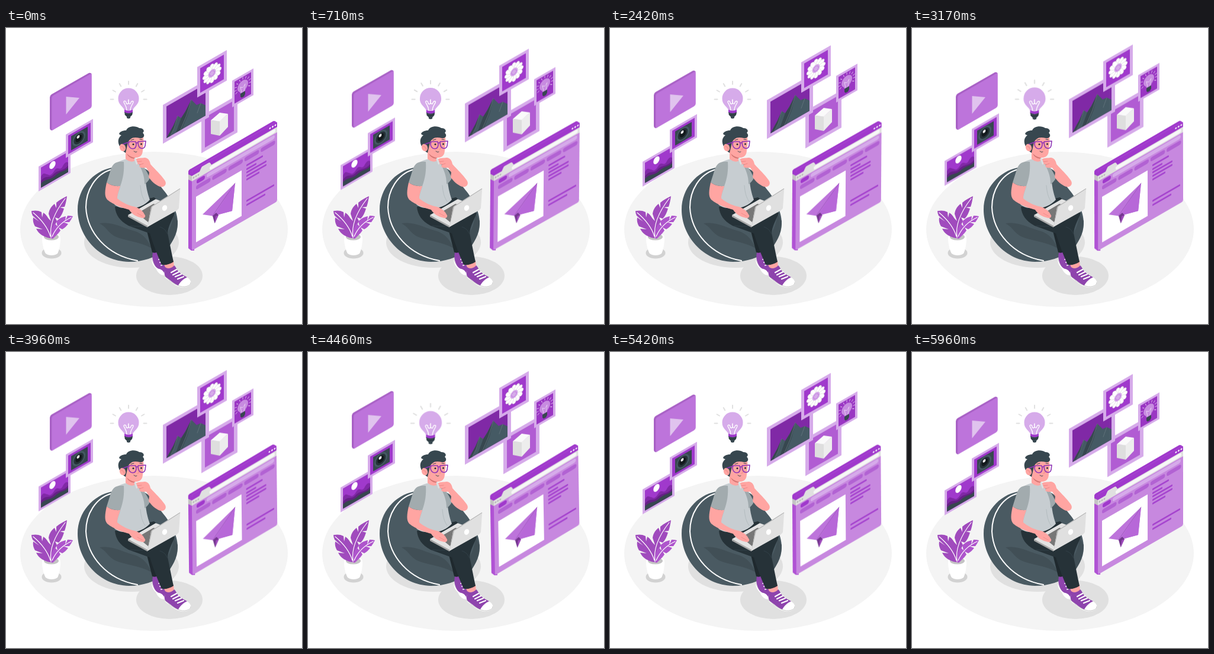
An HTML page for the animation above (6 s loop, 500 by 500 pixels).

```html
<!DOCTYPE html>
<html lang="en">
<head>
<meta charset="utf-8">
<title>Creative thinking</title>
<style>
html, body { margin: 0; width: 100%; height: 100%; overflow: hidden; background: #fff; }
svg { display: block; width: 100vw; height: 100vh; }
.float { animation: float 6s linear infinite; }
.quick { animation-duration: 3s; }
.beat { animation: beat 3s linear infinite; transform-origin: 207px 121px; }
.sway { animation: sway 6s linear infinite; transform-origin: 383px 266px; }
@keyframes float { 50% { transform: translateY(-10px); } }
@keyframes beat {
  0%, 30%, 40%, 60%, 100% { transform: scale(1); }
  10%, 50% { transform: scale(1.1); }
}
@keyframes sway {
  0%, 100% { transform: rotate(0deg); }
  25% { transform: rotate(1deg); }
  75% { transform: rotate(-1deg); }
}
.main { fill: #a039cc; }
.mid { fill: #bd74db; }
.pale { fill: #d6abea; }
.deep { fill: #8029a6; }
.dark { fill: #37474f; }
.slate { fill: #455a64; }
.ink { fill: #263238; }
.skin { fill: #ffa5a2; }
.white { fill: #fff; }
.grey { fill: #e0e0e0; }
.line { fill: none; stroke-linecap: round; stroke-linejoin: round; }
</style>
</head>
<body>
<svg viewBox="0 0 500 500">
  <ellipse cx="250" cy="340" rx="226" ry="131" fill="#f4f4f4"/>
  <g class="grey">
    <ellipse cx="212" cy="362" rx="80" ry="43"/>
    <ellipse cx="276" cy="418.5" rx="56" ry="32.5"/>
    <ellipse cx="77" cy="380" rx="16.5" ry="9.5" fill="#d2d2d2"/>
  </g>

  <!-- plant -->
  <g>
    <path class="white" d="M61 354C61 366 64 376 67 381C72 385 82 385 87 381C90 375 92 366 92 354Z"/>
    <ellipse class="white" cx="76.5" cy="353" rx="15.5" ry="7"/>
    <ellipse cx="76.5" cy="353" rx="12.5" ry="5.5" fill="#c4c4c4"/>
    <path d="M76 352C70 340 69 330 70 320L76 326L72 314C73 306 77 301 82 297L85 304L85 295C91 290 97 287 103 284C102 291 101 296 99 302L91 303L98 305C96 312 93 318 89 322L83 320L86 326C82 334 79 342 79 353Z" fill="#a04bbd"/>
    <path d="M75 355C65 354 55 348 51 339L62 340L49 335C46 330 45 325 46 320L56 327L45 317Q43 313 43 309C49 308 55 308 60 311L61 320L63 312C68 315 71 320 73 325L70 331L74 328C77 337 79 346 79 355Z" fill="#a04bbd"/>
    <path d="M75 355C75 345 78 336 82 330L87 335L85 327C89 322 95 319 101 318L100 326L104 317Q109 317 113 318C111 322 109 325 107 328L97 328L105 331C102 335 99 338 95 340L89 337L92 342C88 348 83 352 79 356Z" fill="#ae55cc"/>
    <g class="line" stroke="#fff" stroke-width="1.2">
      <path d="M76 354C73 334 82 311 100 288"/>
      <path d="M75 352C70 336 58 322 46 312"/>
      <path d="M78 352C84 338 95 327 110 320"/>
    </g>
  </g>

  <!-- bean bag -->
  <path d="M178 236C148 242 121 270 121 307C121 350 156 394 208 395C255 395 290 366 290 330C290 308 278 288 263 270C253 256 245 240 230 236C214 231 194 231 178 236Z" fill="#4a5a62"/>
  <path d="M158 330C178 326 196 337 214 342C232 347 239 357 246 372C224 360 202 360 184 352C174 347 168 335 158 330ZM272 348C278 338 282 325 283 313L290 326C290 342 284 356 277 367Z" fill="#414f56"/>
  <path class="line" d="M178 239C151 247 135 274 135 303C137 345 170 384 222 393" stroke="#fff" stroke-width="2"/>

  <!-- shoes -->
  <g fill="#8e44ad">
    <path d="M248 379L257 377C261 386 266 395 270 399L268 418C261 417 258 413 256 408C252 402 245 393 248 379Z"/>
    <path class="white" d="M246 391C249 400 254 406 259 407C264 408 268 413 268 418C260 418 256 412 253 406C249 402 246 397 246 391Z"/>
    <path class="skin" d="M266 397L283 393L284 404L270 407Z"/>
    <path class="white" d="M268 411C266 420 269 423 276 427C284 434 292 439 302 438C309 437 314 433 312 428C309 420 300 420 294 414Z"/>
    <path d="M269 404C274 408 281 405 284 401C287 403 288 408 292 412C296 416 302 419 306 421C299 424 294 429 291 435C283 432 278 426 270 421C266 417 269 410 269 404Z"/>
    <g class="line" stroke="#fff" stroke-width="2.2">
      <path d="M279 413L288 408M282 417L292 412M286 420L296 416M290 424L300 420"/>
      <path d="M258 391L263 389M260 396L266 393M262 401L268 398" stroke-width="1.8"/>
    </g>
    <path class="line" d="M268 419C277 428 290 438 302 437C308 436 312 434 312 430" stroke="#bcbcbc" stroke-width=".8"/>
  </g>

  <!-- trousers -->
  <path d="M238 343L247 379C252 381 256 379 258 375L268 399L272 360Z" fill="#1f292e"/>
  <path class="ink" d="M184 302C185 315 192 326 207 334L243 347C248 364 255 382 263 400C270 401 277 399 283 395C279 377 276 360 273 347C274 335 279 327 285 313L250 286L225 292Z"/>
  <path class="line" d="M210 334C225 336 238 335 248 331M272 347C270 341 266 338 260 336" stroke="#37474f" stroke-width=".7"/>

  <!-- shirt -->
  <path d="M190 226C199 221 212 219 221 222C229 226 233 236 235 249C236 266 239 280 243 290C235 299 224 304 210 305C198 305 188 303 183 298C184 287 188 278 190 266Z" fill="#c7cdd1"/>
  <path d="M222 225C231 230 237 240 243 253C241 258 238 261 234 264C234 250 230 240 222 225Z" fill="#9fa9ad"/>
  <path d="M199 226C184 224 179 231 176 242L170 261C177 266 186 268 193 267C198 254 200 240 199 226Z" fill="#a2abae"/>
  <path class="line" d="M193 267C189 279 186 287 185 298M227 266C228 278 230 286 235 293" stroke="#aab3b7" stroke-width=".7"/>

  <!-- laptop -->
  <path d="M206 316L253 289L292 304L239 336Z" fill="#e3e3e3"/>
  <path d="M206 316L239 334V337L206 319Z" fill="#a9a9a9"/>
  <path d="M222 313L249 297L257 299L240 328Z" fill="#777"/>

  <!-- left arm -->
  <path class="skin" d="M170 261C167 275 166 284 171 290C182 299 197 304 208 307C212 314 220 319 230 321C234 322 237 318 234 315C230 306 220 302 213 301C203 298 194 293 188 288C188 280 191 274 193 267C185 268 177 266 170 261Z"/>
  <path class="line" d="M222 313L231 318" stroke="#ed817f" stroke-width=".7"/>

  <path class="grey" d="M245 303Q246 301 248 300L292 272Q295 270 294 274L292 304Q291 306 289 308L239 336Z"/>
  <path d="M245 303Q246 301 248 300L292 272Q295 270 294 272L247 302L239 336Z" fill="#b5b5b5"/>
  <ellipse class="white" cx="268" cy="304" rx="4" ry="5" transform="rotate(25 268 304)"/>

  <!-- head -->
  <path class="skin" d="M202 203L202 221C208 227 217 227 219 222L217 212Z"/>
  <path d="M204 212C208 216 213 218 218 219L217 221C210 220 206 217 204 212Z" fill="#d47774"/>
  <path class="skin" d="M201 188L231 182C234 190 232 198 231 206C231 214 227 219 220 219C211 219 205 214 202 208Z"/>
  <path class="dark" d="M193 202C187 191 190 185 195 181C187 180 193 173 203 173C205 166 218 164 225 169C232 169 235 174 231 177C236 182 232 187 226 186C220 185 215 184 210 188C207 190 206 193 205 198L202 211C198 208 195 206 193 202Z"/>
  <ellipse class="skin" cx="197" cy="202" rx="5" ry="6.5" transform="rotate(-20 197 202)"/>
  <path class="line" d="M195 200C198 200 199 203 200 205" stroke="#e57c7b" stroke-width=".8"/>
  <g class="line" stroke="#8e35b5" stroke-width="1.6">
    <path d="M208 192H219L220 196C220 201 218 204 214 204C210 204 207 200 207 196Z"/>
    <path d="M223 192L236 191L235 199C234 203 231 204 228 203C224 202 223 198 223 192Z"/>
    <path d="M220 194L223 194M207 193L198 196"/>
  </g>
  <g class="ink"><circle cx="215" cy="196.5" r="1.5"/><circle cx="228.5" cy="196" r="1.5"/></g>
  <path class="line" d="M211 189.5L216 188M226 188L230 188.5M216 208C218 210 220 210 221 209" stroke="#37474f" stroke-width="1"/>
  <path class="line" d="M223 199C225 203 225 205 222 205" stroke="#e57c7b" stroke-width=".8"/>

  <!-- right arm -->
  <path class="skin" d="M219 222C222 219 229 220 234 219C240 219 243 224 244 230C252 239 262 248 268 257C273 264 267 270 260 268C252 265 245 258 241 252L242 244L237 236C232 236 228 237 225 234L227 230C223 231 220 230 221 228C218 227 217 224 219 222Z"/>
  <path class="line" d="M221 226L229 225M226 231L232 229" stroke="#e57c7b" stroke-width=".7"/>
  <path class="line" d="M218 221L221 229" stroke="#d9dfe1" stroke-width="3"/>

  <!-- idea bulb -->
  <g class="beat">
    <g id="rays" class="line" stroke="#e0e0e0" stroke-width="2"></g>
    <path class="pale" d="M200 139C199 133 189 130 189.5 119A17.500 17.500 0 0 1 224.500 119C225 130 215 133 214 139Z"/>
    <path class="line" d="M204 139C204 132 200 129 199 125C199 122 203 123 203 126C203 129 207 129 207 126C207 123 207 120 207 121C206 123 207 129 210 128C211 126 212 122 215 124C216 127 210 131 210 139" stroke="#fff" stroke-width="1.3"/>
    <path class="main" d="M200 138Q207 141 214 138V143Q207 146 200 143Z"/>
    <path class="dark" d="M200 142Q207 146 214 142L213 147L210 150V152Q207 154 204 152V150L201 147Z"/>
    <path class="line" d="M201 146Q207 149 213 145" stroke="#263238" stroke-width="1"/>
  </g>

  <!-- video card -->
  <g class="float quick">
    <path d="M74 117Q74 114 77 112L140 76Q143 75 145 78L80 116V172L77 173Q74 172 74 169Z" fill="#a860c5"/>
    <rect class="mid" width="67.5" height="58" rx="3" transform="matrix(1 -.577 0 1 77.3 115.5)"/>
    <path d="M101.500 116L124 118L101.500 146Z" fill="#e0c3ee"/>
  </g>

  <!-- left pictures -->
  <g class="float">
    <g transform="matrix(1 -.577 0 1 55 234)">
      <rect class="pale" width="54" height="42"/>
      <rect class="main" x="4" y="4" width="46" height="34"/>
      <path class="deep" d="M4 20C8 13 11 19 15 22C20 28 23 26 27 22C32 17 35 28 40 24C45 18 47 19 50 22V38H4Z"/>
      <path d="M4 27C12 20 18 32 25 28C33 23 40 33 50 27V38H4Z" fill="#652085"/>
      <path class="dark" d="M4 31C13 27 18 34 27 32C36 28 43 34 50 31V38H4Z"/>
      <ellipse class="white" cx="23.5" cy="11" rx="5.2" ry="6"/>
    </g>
    <g transform="matrix(1 -.577 0 1 101 180)">
      <rect class="pale" width="46" height="39.5"/>
      <rect class="main" x="4" y="4" width="38" height="31.5"/>
      <rect class="dark" x="9" y="8" width="28" height="24"/>
      <circle class="slate" cx="22" cy="19.5" r="11"/>
      <circle class="ink" cx="22" cy="19.5" r="8.5"/>
      <circle cx="22" cy="19" r="5.5" fill="#12191c"/>
      <circle class="white" cx="21" cy="16" r="2.4"/>
    </g>
  </g>

  <!-- right pictures -->
  <g class="float">
    <g transform="matrix(1 -.577 0 1 330 148.5)">
      <rect class="pale" width="61" height="63"/>
      <rect x="6" y="6" width="49" height="51" fill="#b15cd3"/>
    </g>
    <path d="M346 156L361 157V182L346 179Z" fill="#dedede"/>
    <path d="M361 157L375 145V167L361 182Z" fill="#ededed"/>
    <path d="M346 156L361 143L375 145L361 157.500Z" fill="#fafafa"/>
    <g transform="matrix(1 -.577 0 1 265 130)">
      <rect class="pale" width="78" height="65.5"/>
      <rect class="deep" x="6" y="6" width="66" height="53.5"/>
      <path class="slate" d="M6 59.500L18 45L25 33L31 40L38 33L48 19L57 33L64 34L72 42V59.500Z"/>
      <path class="dark" d="M6 59.500L18 45L25 33L21 47L14 59.500ZM22 59.500L31 40L38 33L48 19L42 41L32 59.500Z"/>
      <path class="line" d="M25 33L19 50L13 59M48 19L40 41L30 59M64 34L58 47" stroke="#6c7d85" stroke-width=".6"/>
    </g>
    <g transform="matrix(1 -.577 0 1 323 66)">
      <rect class="pale" width="50" height="51.5"/>
      <rect class="main" x="5" y="5" width="40" height="41.5"/>
      <g id="flower" class="white" stroke="#c7c7c7" stroke-width=".4"></g>
      <circle class="pale" cx="25" cy="25" r="6.5"/>
      <circle class="line" cx="25" cy="25" r="4" stroke="#bd74db" stroke-width="1" stroke-dasharray="1 1.5"/>
    </g>
    <g transform="matrix(1 -.577 0 1 382 89)">
      <rect class="pale" width="36" height="45"/>
      <rect x="4" y="4" width="28" height="37" fill="#9a36c3"/>
      <g id="sparks" class="line" stroke="#e3c5f0" stroke-width=".9"></g>
      <path d="M14 30C14 26 9 25 9 19A9 9 0 0 1 27 19C27 25 22 26 22 30Z" fill="#c78be0"/>
      <path class="line" d="M16 29L14 19L18 22L22 18L20 29" stroke="#e9d2f3" stroke-width=".8"/>
      <path class="dark" d="M14 30H22V35L20 38H16L14 35Z"/>
    </g>
  </g>

  <!-- browser window -->
  <g class="sway">
    <path d="M308 243Q308 240 312 238L318 242V376L313 376L308 372Z" fill="#b052d4"/>
    <path d="M308 247L314 250V259L308 256Z" fill="#c4c4c4"/>
    <path class="main" d="M308 247V244Q308 240 312 238L451 157.500Q454 156 458 160L314 250Z"/>
    <g transform="matrix(1 -.577 0 1 314 247)">
      <rect y="-6" width="144" height="135" rx="3" fill="#c788df"/>
      <path class="main" d="M0 4V-3Q0 -6 3 -6H141Q144 -6 144 -3V4Z"/>
      <path class="grey" d="M0 3H13L16 -2Q17 -3 18 -3H28Q30 -3 31 -1L33 3H144V12H0Z"/>
      <rect class="white" x="30" y="4.5" width="111" height="6" rx="3" fill-opacity=".75"/>
      <g fill="#b5b5b5"><circle cx="3" cy="7.5" r="1.4"/><circle cx="7" cy="7.5" r="1.4"/><circle cx="11" cy="7.5" r="1.4"/></g>
      <g class="white"><circle cx="132" cy="-1.5" r="1.4"/><circle cx="136.5" cy="-1.5" r="1.4"/><circle cx="141" cy="-1.5" r="1.4"/></g>
      <rect class="main" x="8" y="14" width="14" height="7" rx="3"/>
      <rect class="pale" x="25" y="14" width="115" height="6.5" rx="3"/>
      <g id="tabs" fill="#b262d3"></g>
      <rect class="white" x="7" y="42" width="77" height="77"/>
      <g id="lines" class="main"></g>
    </g>
    <path class="mid" d="M387 262L332 315L349 317.500L382 309Z"/>
    <path d="M387 262L351 317.500L382 309Z" fill="#b768d8"/>
    <path d="M349 317.500L355 312L359 316L352.500 330Z" fill="#74368f"/>
    <path d="M359 316L352.500 330L354 318Z" fill="#a04bbd"/>
    <path class="line" d="M387 262L349 317" stroke="#8e44ad" stroke-width=".6"/>
  </g>
</svg>
<script>
const add = (id, tag, attrs) => {
  const el = document.createElementNS('http://www.w3.org/2000/svg', tag);
  for (const key in attrs) el.setAttribute(key, attrs[key]);
  document.getElementById(id).append(el);
};

const ray = (id, x, y, deg, from, to) => {
  const a = deg * Math.PI / 180, c = Math.cos(a), s = Math.sin(a);
  add(id, 'line', { x1: x + from * c, y1: y + from * s, x2: x + to * c, y2: y + to * s });
};

for (let deg = 180; deg <= 360; deg += 30) ray('rays', 207, 120.5, deg, 25.5, 30.5);
for (let deg = 150; deg <= 390; deg += 24) ray('sparks', 18, 19, deg, 11, 14);

for (let deg = 0; deg < 360; deg += 30) {
  add('flower', 'ellipse', { cx: 25, cy: 14.8, rx: 3.8, ry: 5.8, transform: `rotate(${deg} 25 25)` });
}

for (let i = 0; i < 5; i++) {
  add('tabs', 'rect', { x: 7 + i * 27.3, y: 23.5, width: 24.5, height: 7, rx: 3 });
}

// top and width of each text line
[[37, 28], [43.5, 17], [49, 34], [55, 34], [61, 22], [97, 47], [104, 32]].forEach(([y, width]) => {
  add('lines', 'rect', { x: 92, y, width, height: 3, rx: 1, 'fill-opacity': .85 });
});
</script>
</body>
</html>
```
